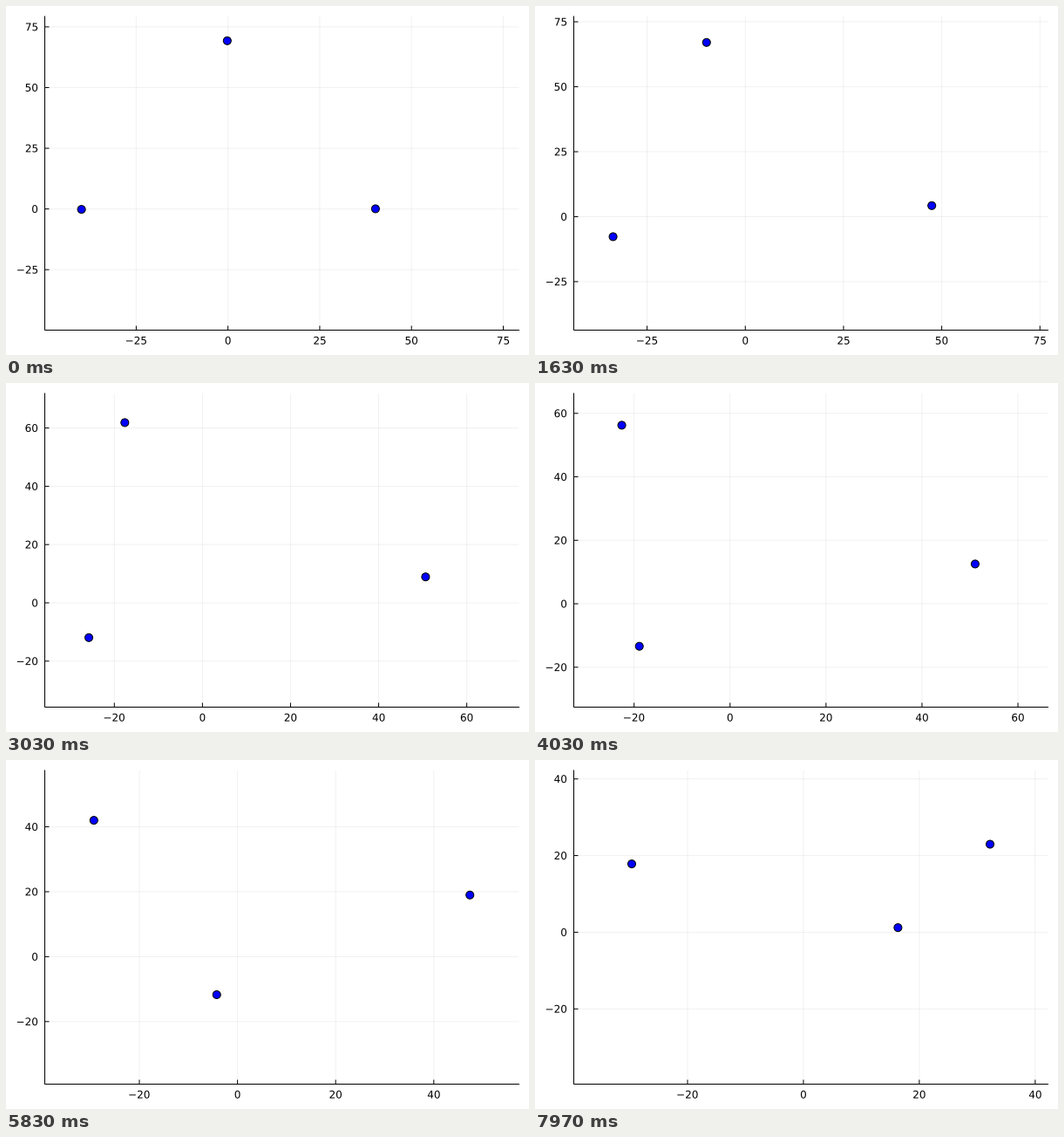
Recreate the animation shown at these times as a matplotlib script. Size 600 px wide and 400 px high, loop 8 s.

```python
import numpy as np
import matplotlib.pyplot as plt
from matplotlib.animation import FuncAnimation
from matplotlib.patches import Circle, PathPatch
from matplotlib.textpath import TextPath
from matplotlib.transforms import Affine2D

W, H, DPI = 600, 400, 100
FRAMES, INTERVAL = 400, 20
STEPS = 240  # simulation steps shown in one loop, 30 per second
LEFT, RIGHT, TOP, BOTTOM = 44.5, 588.5, 12.0, 371.5
PX = 72 / DPI  # one pixel in points

GRAVITY = 6.63
SUBSTEPS = 8
MARGIN = 10

START = np.array([[-40, 0], [40, 0], [0, 40 * np.sqrt(3)]])
VELOCITY = np.array([[0.0903, -0.1787], [0.1883, 0.0660], [-0.1999, -0.0010]])


def acceleration(pos):
    gap = pos[None] - pos[:, None]
    dist = np.sqrt((gap ** 2).sum(-1)) + np.eye(len(pos))
    return GRAVITY * (gap / dist[..., None] ** 3).sum(1)


def simulate():
    """Leapfrog integration of three equal masses, one entry per step."""
    pos, vel = START.copy(), VELOCITY.copy()
    dt = 1 / SUBSTEPS
    path = []
    for _ in range(STEPS):
        for _ in range(SUBSTEPS):
            vel += acceleration(pos) * dt / 2
            pos += vel * dt
            vel += acceleration(pos) * dt / 2
        path.append(pos.copy())
    return path


def tick_values(lo, hi):
    step = 25 if lo < -40 and hi > 60 else 20
    return np.arange(np.ceil(lo / step), np.floor(hi / step) + 1) * step


path = simulate()

fig = plt.figure(figsize=(W / DPI, H / DPI), dpi=DPI, facecolor="white")
ax = fig.add_axes([0, 0, 1, 1])
ax.set_xlim(0, W)
ax.set_ylim(H, 0)
ax.axis("off")

MAX_TICKS = 8
FONT_PX = 12
DIGIT_H = 0.73 * FONT_PX


def line(**style):
    return ax.plot([], [], lw=PX, solid_capstyle="butt", snap=False,
                   color="black", **style)[0]


def label():
    return ax.add_patch(PathPatch(glyphs("0"), fc="black", lw=0, zorder=3))


def glyphs(text):
    return TextPath((0, 0), text, size=FONT_PX, prop="DejaVu Sans")


def place(item, text, x, y, align):
    """Set the outline of text; align 0.5 centres it on x, 1 ends it there."""
    shape = glyphs(text)
    box = shape.get_extents()
    move = Affine2D().translate(-box.x0 - align * box.width, -DIGIT_H / 2)
    item.set_path(move.scale(1, -1).translate(x, y).transform_path(shape))


grid = [line(alpha=0.055, zorder=1) for _ in range(2 * MAX_TICKS)]
marks = [line(zorder=2) for _ in range(2 * MAX_TICKS)]
labels = [label() for _ in range(2 * MAX_TICKS)]
ax.plot([LEFT, LEFT, RIGHT], [TOP, BOTTOM, BOTTOM], color="black", lw=PX,
        snap=False, solid_joinstyle="miter", zorder=3)
balls = [ax.add_patch(Circle((0, 0), 4.5, fc="blue", ec="black", lw=PX,
                             zorder=4)) for _ in START]


def draw(frame):
    mid_ms = frame * INTERVAL + INTERVAL // 2
    pos = path[(3 * mid_ms + 10) // 100]
    lo, hi = pos.min() - MARGIN, pos.max() + MARGIN

    def to_x(v):
        return LEFT + (RIGHT - LEFT) * (v - lo) / (hi - lo)

    def to_y(v):
        return BOTTOM - (BOTTOM - TOP) * (v - lo) / (hi - lo)

    for item in grid + marks + labels:
        item.set_visible(False)

    for i, v in enumerate(tick_values(lo, hi)):
        x, y = to_x(v), to_y(v)
        j = i + MAX_TICKS
        grid[i].set_data([x, x], [TOP, BOTTOM])
        grid[j].set_data([LEFT, RIGHT], [y, y])
        marks[i].set_data([x, x], [BOTTOM - 5, BOTTOM])
        marks[j].set_data([LEFT, LEFT + 5], [y, y])
        text = f"{v:.0f}".replace("-", "\u2212")
        place(labels[i], text, x, 383.3, 0.5)
        place(labels[j], text, 36.1, y, 1)
        for group in (grid, marks, labels):
            group[i].set_visible(True)
            group[j].set_visible(True)

    for ball, (x, y) in zip(balls, pos):
        ball.center = to_x(x), to_y(y)
    return [*balls, *grid, *marks, *labels]


anim = FuncAnimation(fig, draw, frames=FRAMES, interval=INTERVAL,
                     init_func=lambda: draw(0), repeat=True, repeat_delay=0,
                     blit=False)
plt.show()
```
